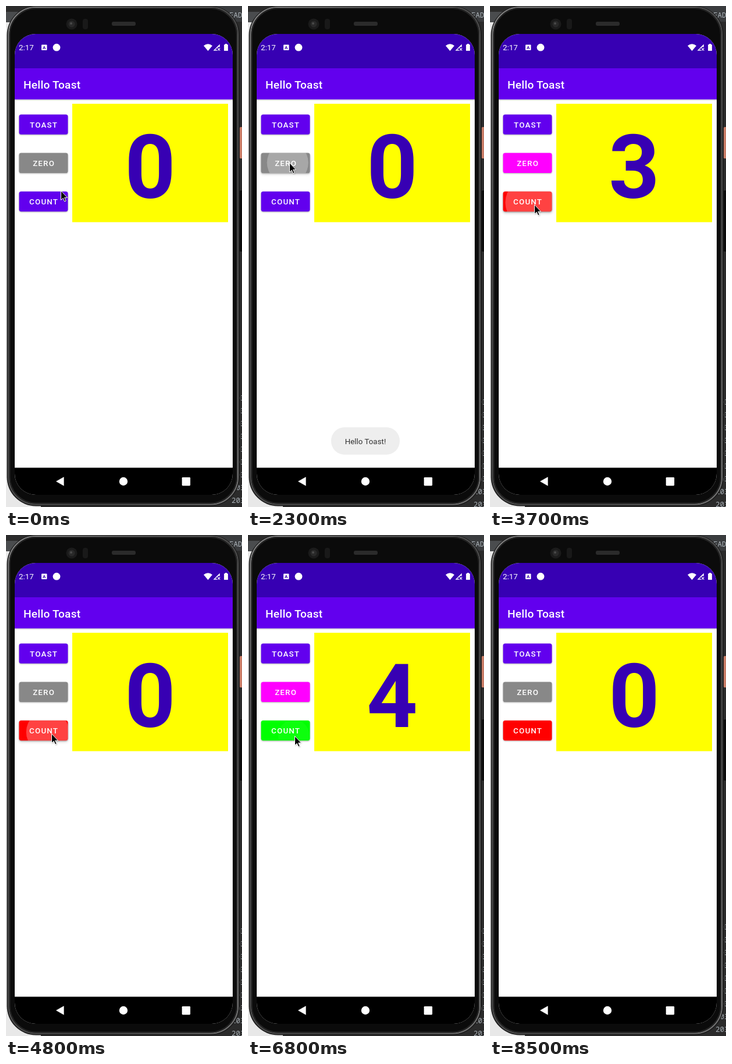
Recreate the animation shown at these times as an HTML page. Size 406 by 861 pixels, loop 8600 ms.

```html
<!DOCTYPE html>
<html lang="en">
<head>
<meta charset="utf-8">
<title>Hello Toast</title>
<style>
  html, body { margin: 0; width: 100%; height: 100%; overflow: hidden; background: #2b2b2b; }
  svg { display: block; width: 406px; height: 861px; font-family: Roboto, sans-serif; }
  .label { font-size: 13.36px; font-weight: 500; letter-spacing: 1.19px; fill: #fff; text-anchor: middle; }
  .title { font-size: 19.1px; font-weight: 500; letter-spacing: .24px; }
  .mono { font: 12.5px "Noto Sans Mono", "DejaVu Sans Mono", monospace; fill: #a9b0b6; }
</style>
</head>
<body>
<svg viewBox="0 0 406 861">
  <defs>
    <linearGradient id="rim" x2="1" y2="1">
      <stop offset="0" stop-color="#8a8a8a"/>
      <stop offset=".3" stop-color="#555"/>
      <stop offset=".7" stop-color="#4c4c4c"/>
      <stop offset="1" stop-color="#7a7a7a"/>
    </linearGradient>
    <linearGradient id="drop" x2="0" y2="1">
      <stop offset="0" stop-opacity=".22"/>
      <stop offset="1" stop-opacity="0"/>
    </linearGradient>
    <clipPath id="screen"><rect x="15" y="48" width="375" height="792" rx="36"/></clipPath>
    <filter id="soft" x="-20%" y="-30%" width="140%" height="180%"><feGaussianBlur stdDeviation="1"/></filter>
    <filter id="wide" x="-20%" y="-50%" width="140%" height="200%"><feGaussianBlur stdDeviation="2.4"/></filter>
  </defs>

  <!-- desktop behind the phone -->
  <rect width="406" height="861" fill="#2b2b2b"/>
  <rect y="28" width="60" height="833" fill="#e8e8e8"/>
  <rect y="10" width="40" height="18" fill="#4a4c4e"/>
  <rect x="350" width="56" height="27" fill="#3a3c3e"/>
  <text class="mono" x="384" y="20">EAD</text>
  <g id="log" class="mono"></g>

  <!-- phone body -->
  <rect x="402" y="208" width="6" height="54" rx="1.5" fill="#c87c66"/>
  <rect x="402" y="317" width="6" height="105" rx="1.5" fill="#0c0c0c"/>
  <rect x="1.5" y="0" width="400.5" height="859.5" rx="50" fill="#1e1e1e"/>
  <rect x="4.5" y="2" width="394.5" height="854.5" rx="47" fill="#0a0a0a" stroke="url(#rim)" stroke-width="2"/>
  <rect x="6.5" y="4" width="390.5" height="850.5" rx="45" fill="#0b0b0b" stroke="#242424" stroke-width="2"/>
  <circle cx="113" cy="31" r="9.5" fill="#1b1b1b"/>
  <circle cx="113" cy="31" r="5.5" fill="#292929"/>
  <circle cx="112" cy="30" r="2" fill="#4a4a4a"/>
  <rect x="132" y="22" width="9" height="18" rx="4" fill="#191919"/>
  <rect x="182" y="27" width="41" height="7" rx="3" fill="#2b2b2b"/>

  <g clip-path="url(#screen)">
    <rect x="15" y="48" width="375" height="792" fill="#fff"/>
    <rect x="15" y="48" width="375" height="59" fill="#3700b3"/>
    <rect x="15" y="160" width="375" height="3.5" fill="url(#drop)"/>
    <rect x="15" y="107" width="375" height="53.5" fill="#6200ee"/>
    <rect x="15" y="793.5" width="375" height="47" fill="#000"/>
  </g>

  <!-- status bar, title and navigation -->
  <g fill="#fff">
    <text x="22" y="76.3" font-size="13.36">2:17</text>
    <rect x="61" y="66.5" width="9.5" height="9.5" rx="1"/>
    <text x="65.75" y="74.2" font-size="8" font-weight="700" fill="#3700b3" text-anchor="middle">A</text>
    <circle cx="87" cy="71.2" r="6.4"/>
    <path d="M340 68.2Q347.5 62.4 355 68.2L347.5 77.2Z"/>
    <path d="M356.5 76.7L367.8 65.4V70.5H366V70L359.5 75.2H363V76.7Z"/>
    <path d="M364.2 72.4l4 4.3m0-4.3l-4 4.3" stroke="#fff" stroke-width="1.2"/>
    <path d="M377 65h3v1.3h1.9V77h-6.8V66.3H377Z"/>
    <text class="title" x="30" y="141.5">Hello Toast</text>
    <path d="M86 817L99.6 809.3V824.7Z"/>
    <circle cx="202" cy="817" r="7.2"/>
    <rect x="302.7" y="810" width="14.4" height="14.4" rx="1.3"/>
  </g>

  <!-- counter -->
  <rect x="114" y="168" width="268" height="203.5" fill="#ff0"/>
  <text id="number" x="248" y="330.2" font-size="152.7" font-weight="700" fill="#3700b3" text-anchor="middle">0</text>

  <g id="buttons"></g>

  <g id="toast" opacity="0">
    <rect x="143" y="724" width="118" height="47" rx="23" fill="#eee"/>
    <text x="202" y="752.6" font-size="13.36" fill="#333" text-anchor="middle">Hello Toast!</text>
  </g>

  <g id="cursor">
    <path d="M1 1.5V18l3.800-3.600 2.700 6 2.800-1.200-2.700-5.900H13Z" opacity=".25" filter="url(#soft)"/>
    <path d="M.5.600V16.500L4.200 13.200 6.800 19 9.200 18 6.700 12.300H11.600Z" stroke="#fff"/>
  </g>
</svg>
<script>
const LOOP = 8600, STEP = 100;
const PURPLE = '#6200ee', RED = '#ff0000', GREEN = '#00ff00', GRAY = '#888888', PINK = '#ff00ff';
const $ = id => document.getElementById(id);
const clamp = v => Math.max(0, Math.min(1, v));
const mix = (a, b, k) => a + (b - a) * k;

function add(parent, tag, attrs, text) {
  const el = document.createElementNS('http://www.w3.org/2000/svg', tag);
  for (const key in attrs) el.setAttribute(key, attrs[key]);
  if (text) el.textContent = text;
  parent.append(el);
  return el;
}

// cursor path: time, x, y
const path = [
  [300, 94, 317], [700, 65, 206], [1500, 65, 206], [1800, 71, 269],
  [2700, 71, 269], [2900, 76, 341], [3750, 76, 341], [4000, 75, 260],
  [4300, 75, 260], [4600, 78, 341], [6300, 78, 341], [6700, 80, 345],
  [6890, 80, 345], [7200, 75, 259], [7500, 75, 259], [7900, 302, 326], [8200, 103, -3]
];

// taps: button, press, release
const TOAST = 0, ZERO = 1, COUNT = 2;
const taps = [
  [TOAST, 915, 1150], [ZERO, 2215, 2700],
  [COUNT, 3005, 3150], [COUNT, 3290, 3410], [COUNT, 3565, 3690],
  [ZERO, 4105, 4300], [COUNT, 4705, 4880], [COUNT, 5405, 5590],
  [COUNT, 6110, 6290], [COUNT, 6380, 6480], [COUNT, 6785, 6890],
  [ZERO, 7305, 7450]
];

const buttons = ['TOAST', 'ZERO', 'COUNT'].map((name, i) => {
  const y = 186.4 + i * 66.2, box = { x: 22.5, y, width: 84, height: 34.4, rx: 3.6 };
  const g = $('buttons');
  add(add(g, 'clipPath', { id: 'clip' + i }), 'rect', box);
  const lifted = add(g, 'rect', { ...box, y: y + 2.5, filter: 'url(#wide)' });
  add(g, 'rect', { ...box, y: y + 1, filter: 'url(#soft)', opacity: 0.3 });
  const face = add(g, 'rect', box);
  const ripples = add(g, 'g', { 'clip-path': `url(#clip${i})`, fill: '#fff' });
  add(g, 'text', { class: 'label', x: 65.1, y: y + 22.3 }, name);
  return { y, lifted, face, ripples };
});

for (let y = 677.5; y < 870; y += 22) add($('log'), 'text', { x: 388, y }, '2031-');

function cursorAt(t) {
  let i = 0;
  while (i < path.length - 1 && path[i + 1][0] <= t) i++;
  const a = path[i], b = path[i + 1] || a;
  const k = clamp((t - a[0]) / (b[0] - a[0] || 1));
  return [mix(a[1], b[1], k), mix(a[2], b[2], k)];
}

function stateAt(t) {
  let n = 0, color = PURPLE;
  for (const [id, , up] of taps) {
    if (up > t) break;
    if (id === ZERO) n = 0;
    if (id === COUNT) color = ++n % 2 ? RED : GREEN;
  }
  return { n, color };
}

function drawRipples(t) {
  buttons.forEach(b => { b.ripples.replaceChildren(); b.lift = 0; });
  for (const [id, down, up] of taps) {
    const age = t - down, fade = clamp(1 - (t - up) / 300);
    if (age <= 0 || fade === 0) continue;
    const b = buttons[id], k = clamp(age / 200), [x, y] = cursorAt(down);
    add(b.ripples, 'circle', {
      cx: mix(x, 64.5, k), cy: mix(y, b.y + 17.2, k), r: 25 + 25 * k,
      opacity: 0.26 * clamp(age / 75) * fade
    });
    b.lift = Math.max(b.lift, k * fade);
  }
}

function draw(t) {
  const { n, color } = stateAt(t);
  $('number').textContent = n;
  drawRipples(t);
  [PURPLE, n ? PINK : GRAY, color].forEach((fill, i) => {
    buttons[i].face.setAttribute('fill', fill);
    buttons[i].lifted.setAttribute('opacity', 0.3 * buttons[i].lift);
  });
  $('toast').setAttribute('opacity', Math.min(clamp((t - 1200) / 300), clamp((3500 - t) / 300)));
  $('log').setAttribute('transform', `translate(0 ${t >= 1400 && t < 8500 ? 7 : 0})`);
  const [x, y] = cursorAt(t);
  $('cursor').setAttribute('transform', `translate(${x} ${y})`);
  $('cursor').setAttribute('visibility', t < 8300 ? 'visible' : 'hidden');
}

const start = performance.now();
function tick() {
  const t = (performance.now() - start) % LOOP;
  draw(Math.floor(t / STEP) * STEP);
  requestAnimationFrame(tick);
}
tick();
</script>
</body>
</html>
```
